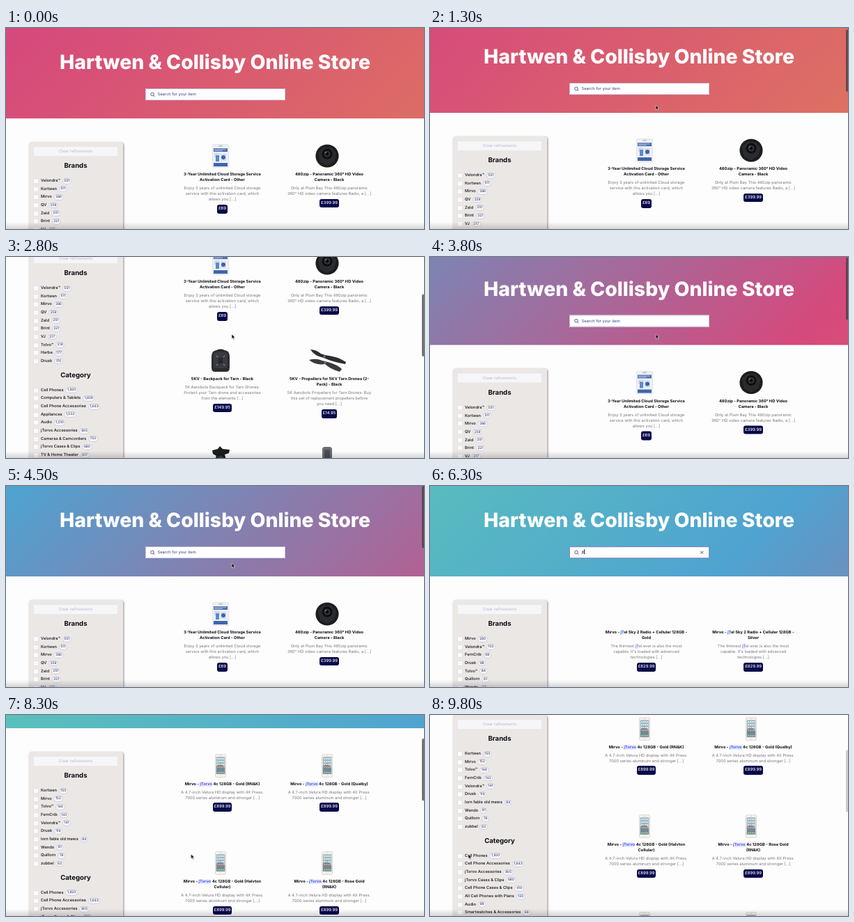
Recreate the animation shown at these times as an HTML page. Size 600x289 px, loop 10000 ms.

```html
<!DOCTYPE html>
<html lang="en">
<head>
<meta charset="utf-8">
<title>Online Store</title>
<style>
@property --scroll { syntax: '<number>'; inherits: true; initial-value: 0; }
*, ::before { box-sizing: border-box; margin: 0; padding: 0; }
html, body { width: 100%; height: 100%; overflow: hidden; background: #fefdfe; }
#stage {
  --t: 0;
  --now: calc(var(--t) * -1ms);
  position: relative; width: 600px; height: 289px; overflow: hidden;
  font: 500 5.75px/8.3px Inter, sans-serif; color: #0d0d12;
  text-rendering: geometricPrecision; white-space: nowrap;
  animation: scroll 10s linear var(--now) infinite paused;
}
#stage > *, .at { position: absolute; }
#page { inset: 0; transform: translateY(calc(var(--scroll) * -1px)); }

#hero {
  left: 0; top: 0; width: 600px; height: 130px;
  background: linear-gradient(-45deg, #df7b5b, #d6497c, #4fa3d1, #60d0b0) 0 50% / 400% 400%;
  animation: drift 15s ease calc(var(--now) - 5500ms) infinite paused;
}
h1 { left: 0; top: 29px; width: 600px; text-align: center; color: #fff; font: 800 28.4px/40px Inter, sans-serif; }
#search {
  left: 200px; top: 87px; width: 200.5px; height: 16.5px; padding-left: 16.5px;
  background: #fff; border: .8px solid #c9c6dc; line-height: 15px; font-weight: 400; color: #3b3c85;
}
#search.focus { border-color: #8f8cc0; }
#search.filled { color: #111; }
#search svg { position: absolute; left: 0; top: 0; fill: none; stroke: #34357a; stroke-width: .8; overflow: visible; }
#caret { display: none; width: .6px; height: 7px; background: #222; vertical-align: -1px; }
#clear { display: none; }
.focus #caret { display: inline-block; }
.filled #clear { display: inline; }

#panel { left: 33px; top: 163.5px; width: 135px; height: 420px; border-radius: 4px; background: #ebe7e5; box-shadow: 1px 1px 3px #8f8a8a; }
#reset { left: 40px; top: 170.5px; width: 120px; height: 13.5px; background: #f6f5f7; color: #bcb9ce; text-align: center; line-height: 13.5px; font-weight: 400; }
.facet { left: 40px; width: 120px; }
.facet h2 { font: 700 9.6px/20px Inter, sans-serif; text-align: center; margin-bottom: 5px; }
.facet p { display: flex; align-items: center; height: 11.67px; }
.facet p::before { content: ''; width: 6px; height: 6px; margin-right: 4px; background: #fbfafc; box-shadow: 0 0 0 .4px #dcd9e6; border-radius: 1px; }
.facet i { margin-left: 3.8px; padding: 0 1.7px; font: 400 4.8px/6.8px Inter, sans-serif; color: #24275c; background: #f5f4f9; box-shadow: 0 0 0 .4px #b4b7d4; border-radius: 3.4px; }

.card { width: 150px; text-align: center; }
.card svg { display: block; width: 60px; height: 34px; margin: 0 auto 6px; transform: translateX(-3px); }
.card h3 { font: 700 5.75px/8.3px Inter, sans-serif; }
.card p { margin: 3.3px 0 2.2px; color: #77777d; font-weight: 400; }
.card b { display: inline-block; padding: 0 1.9px; border-radius: 3px; background: #07084a; color: #fff; font: 500 5.9px/12.6px Inter, sans-serif; }
mark { color: #4a5ce6; background: #e5e8ff; border-radius: 1px; }

#shade { left: 0; top: 279px; width: 600px; height: 10px; background: linear-gradient(#0000, #00000028); animation: shade 10s step-end var(--now) infinite paused; }
#thumb {
  left: 597px; top: 0; width: 3px; height: 89px; border-radius: 1.5px 0 0 1.5px; background: #3c3c40b8;
  transform: translateY(calc(var(--scroll) * .307px)); animation: thumb 10s linear var(--now) infinite paused;
}
#cursor { left: 0; top: 0; width: 6px; height: 8px; overflow: visible; animation: move 10s linear var(--now) infinite paused, seen 10s step-end var(--now) infinite paused; }

@keyframes drift { 50% { background-position: 100% 50%; } }
@keyframes scroll {
  0%, 11% { --scroll: 0; }
  13% { --scroll: 8; }
  15% { --scroll: 24; }
  18% { --scroll: 52; }
  20% { --scroll: 82; }
  23% { --scroll: 130; }
  25% { --scroll: 156; }
  28% { --scroll: 175; }
  30% { --scroll: 176; }
  33% { --scroll: 115; }
  35% { --scroll: 48; }
  38% { --scroll: 3.5; }
  40% { --scroll: 1; }
  43%, 76% { --scroll: 0; }
  78% { --scroll: 20; }
  80% { --scroll: 60; }
  83% { --scroll: 111; }
  85% { --scroll: 141; }
  88% { --scroll: 160; }
  90%, 100% { --scroll: 164; }
}
@keyframes shade { 15% { opacity: 0; } 23% { opacity: 1; } }
@keyframes thumb {
  0%, 12% { opacity: 0; }
  13%, 48% { opacity: 1; }
  53%, 77% { opacity: 0; }
  78%, 95% { opacity: 1; }
  98%, 100% { opacity: .35; }
}
@keyframes move {
  0%, 45% { transform: translate(324px, 111px); }
  48% { transform: translate(318px, 108px); }
  50% { transform: translate(290px, 99px); }
  53% { transform: translate(250px, 95px); }
  55%, 63% { transform: translate(238px, 94px); }
  63.01%, 90% { transform: translate(265.5px, 200px); }
  93% { transform: translate(240px, 200px); }
  95% { transform: translate(120px, 201px); }
  98%, 100% { transform: translate(55px, 200px); }
}
@keyframes seen {
  0% { opacity: 0; }
  13% { opacity: 1; }
  58% { opacity: 0; }
  78%, 100% { opacity: 1; }
}
</style>
</head>
<body>
<div id="stage">
  <div id="page">
    <div id="hero" class="at"></div>
    <h1 class="at">Hartwen &amp; Collisby Online Store</h1>
    <div id="search" class="at">
      <svg width="200" height="15">
        <circle cx="9" cy="7.2" r="2.3"/><path d="M10.7 8.9l1.8 1.8"/>
        <path id="clear" stroke="#222" d="M187.3 5.5l4 4m0-4l-4 4"/>
      </svg><span id="typed"></span><span id="caret"></span>
    </div>
    <div id="panel" class="at"></div>
    <div id="reset" class="at">Clear refinements</div>
    <div id="results"></div>
  </div>
  <div id="shade"></div>
  <div id="thumb"></div>
  <svg id="cursor"><path d="M0 0v6.6l1.6-1.4 1.1 2.5 1.2-.5-1.1-2.4h2.2z" fill="#111" stroke="#fff" stroke-width=".5"/></svg>
</div>
<script>
const pictures = {
  none: '',
  pass: `<rect x="18.5" y=".5" width="23" height="33" rx="1.5" fill="#eef1f6" stroke="#cfd5de" stroke-width=".6"/>
    <rect x="27" y="1.8" width="6" height="1.6" rx=".8" fill="#b5bdca"/><rect x="20" y="6" width="20" height="5" fill="#4a6cb0"/>
    <path d="M21 7.7h17M21 9.4h12" stroke="#dfe8f6" stroke-width=".7"/><path d="M21 14h8M21 16h7M21 18h8" stroke="#9dafcd" stroke-width=".7"/>
    <rect x="23" y="16" width="5" height="9" fill="#5c8bc9"/><rect x="30" y="14" width="8" height="10" fill="#d5deeb"/>
    <circle cx="34" cy="19" r="3" fill="#3c62ae"/><rect x="20" y="27" width="20" height="5" fill="#4064ac"/>`,
  ball: `<circle cx="30" cy="17" r="16.6" fill="#1d1e20"/><path d="M16 12l8-8 12 0 8 9-3 12-11 7-11-6z" fill="#2a2b2e" stroke="#0e0e10" stroke-width=".6"/>
    <circle cx="30" cy="14" r="7.5" fill="#0d0d0f"/><circle cx="30" cy="14" r="4.6" fill="#34363a"/><circle cx="30" cy="14" r="2.4" fill="#09090b"/>
    <circle cx="28" cy="12" r="1" fill="#85888e"/>`,
  pack: `<path d="M21 3q9-4 18 0 4 2 4 9v15q0 6-5 6H22q-5 0-5-6V12q0-7 4-9z" fill="#2b2c2f"/><rect x="20" y="5" width="20" height="23" rx="4" fill="#3a3b3f"/>
    <path d="M26 2q4-2 8 0" fill="none" stroke="#111" stroke-width="1.2"/><path d="M24 10l2 2m10-2l-2 2M24 24l2-2m10 2l-2-2" stroke="#b9bbc0" stroke-width=".9"/>
    <rect x="27" y="13" width="6" height="8" rx="1" fill="#26272a"/>`,
  blades: `<path d="M6 1q8 0 15 6l6 2q18 2 30 10l-1 3q-18-3-31-9-14-3-19-12z" fill="#2c2d30"/>
    <path d="M4 16q10-3 19 1l8 2q14 4 20 10l-3 4q-14-4-21-11-14 2-23-6z" fill="#3a3b3e"/>
    <circle cx="26" cy="11" r="1.6" fill="#77797e"/><circle cx="27" cy="20" r="1.6" fill="#77797e"/>`,
  gimbal: `<path d="M18 6l8-2 3-4 4 4 10 1-1 5-6 2 2 8-4 8-9 2-5-7 4-9-5-3z" fill="#1c1d1f"/><circle cx="30" cy="19" r="5" fill="#3c3e42"/>`,
  pod: `<rect x="23" y="1" width="14" height="32" rx="4" fill="#6b6d72"/><rect x="26" y="5" width="8" height="23" rx="2" fill="#4b4d52"/>`,
  phone: `<rect x="22.5" y=".3" width="15" height="33.4" rx="2.4" fill="#f6f2ee" stroke="#cdbfb2" stroke-width=".6"/>
    <rect x="23.8" y="4.2" width="12.4" height="24.6" fill="#9db9c6"/><path d="M23.8 18l6-5 6.4 7v8.8H23.8z" fill="#71899a"/>
    <path d="M25.2 7h10M25.2 11h10M25.2 15h10" stroke="#e6ece9" stroke-width="1.8" stroke-dasharray="1.8 .9"/>
    <path d="M25.2 19h10" stroke="#e2a077" stroke-width="1.8" stroke-dasharray="1.8 .9"/>
    <path d="M25.2 26.7h10" stroke="#a9d98a" stroke-width="1.8" stroke-dasharray="1.8 .9"/>
    <circle cx="30" cy="31.2" r="1.2" fill="#fff" stroke="#cdbfb2" stroke-width=".4"/><path d="M28.5 2.3h3" stroke="#b5aaa2" stroke-width=".5"/>`
};

const tablet = colour => ['none', `Mirvo - jTel Sky 2 Radio + Cellular 128GB -|${colour}`,
  "The thinnest jTel ever is also the most|capable. It's loaded with advanced|technologies [...]", '£829.99'];
const phone = suffix => ['phone', `Mirvo - jTorvo 4c 128GB - ${suffix}`,
  'A 4.7-inch Velura HD display with 4X Press.|7000 series aluminum and stronger [...]', '£899.99'];

const phoneCategories = 'Cell Phones:1,920/Cell Phone Accessories:1,643/jTorvo Accessories:805/jTorvo Cases & Clips:680/Cell Phone Cases & Clips:414/All Cell Phones with Plans:135/Audio:98/Smartwatches & Accessories:68/Headphones:52';
const catalogue = {
  all: {
    brands: 'Velondra™:551/Kortwen:511/Mirvo:386/QV:259/Zeld:251/Brint:221/VJ:217/Tolvo™:214/Harbe:177/Drusk:170',
    categories: 'Cell Phones:1,920/Computers & Tablets:1,858/Cell Phone Accessories:1,643/Appliances:1,533/Audio:1,010/jTorvo Accessories:805/Cameras & Camcorders:753/jTorvo Cases & Clips:680/TV & Home Theater:617/Home Audio:546',
    cards: [
      ['pass', '3-Year Unlimited Cloud Storage Service|Activation Card - Other', 'Enjoy 3 years of unlimited Cloud storage|service with this activation card, which|allows you [...]', '£69'],
      ['ball', '480zip - Panoramic 360° HD Video|Camera - Black', 'Only at Plum Bay This 480zip panoramic|360° HD video camera features Radio, a [...]', '£399.99'],
      ['pack', '5KV - Backpack for Tarn - Black', '5K Aerobots Backpack for Tarn Drones:|Protect your Tarn drone and accessories|from the elements [...]', '£149.95'],
      ['blades', '5KV - Propellers for 5KV Tarn Drones (2-|Pack) - Black', '5K Aerobots Propellers for Tarn Drones: Buy|this set of replacement propellers before|you need [...]', '£14.95'],
      ['gimbal', '5KV - Tarn Gimbal - Black', '', '£249.99'],
      ['pod', '5KV - Tarn Battery - Gray', '', '£149.99']
    ]
  },
  tablets: {
    brands: 'Mirvo:280/Velondra™:102/FernCrib:98/Drusk:98/Tolvo™:84/Quillorn:81/Wendo:77',
    categories: phoneCategories,
    cards: ['Gold', 'Silver'].map(tablet)
  },
  phones: {
    brands: 'Kortwen:155/Mirvo:152/Tolvo™:144/FernCrib:143/Velondra™:141/Drusk:114/lorn fable old mews:84/Wendo:81/Quillorn:76/zubbel:63',
    categories: phoneCategories,
    cards: ['Gold (RN&K)', 'Gold (Quelby)', 'Gold (Halvton|Cellular)', 'Rose Gold|(RN&K)', 'Silver (RN&K)', 'Silver (Quelby)'].map(phone)
  }
};

const $ = id => document.getElementById(id);
const escape = s => s.replace(/&/g, '&amp;');

function rich(text, query) {
  let html = escape(text);
  if (query) html = html.replace(new RegExp(query, 'gi'), '<mark>$&</mark>');
  return html.replace(/\|/g, '<br>');
}

function facet(title, top, list) {
  const rows = list.split('/').map(row => {
    const [label, count] = row.split(':');
    return `<p>${escape(label)}<i>${count}</i></p>`;
  });
  return `<div class="facet at" style="top:${top}px"><h2>${title}</h2>${rows.join('')}</div>`;
}

function card([picture, title, text, price], i, query) {
  const left = i % 2 ? 389 : 235.5, top = 167 + 140 * (i >> 1);
  return `<div class="card at" style="left:${left}px;top:${top}px">
    <svg viewBox="0 0 60 34">${pictures[picture]}</svg>
    <h3>${rich(title, query)}</h3><p>${rich(text, query)}</p><b>${price}</b></div>`;
}

function show(query) {
  const { brands, categories, cards } = catalogue[!query ? 'all' : query.length < 3 ? 'tablets' : 'phones'];
  $('typed').textContent = query || 'Search for your item';
  $('search').classList.toggle('filled', !!query);
  $('results').innerHTML = facet('Brands', 189.3, brands) + facet('Category', 336, categories)
    + cards.map((c, i) => card(c, i, query)).join('');
}

const keyTimes = [6300, 6300, 6500, 6800, 7000, 7300];
const start = performance.now();
let shown = null;

function tick() {
  const t = (performance.now() - start) % 10000;
  // The picture advances in alternating holds of 300 and 200 ms.
  const step = Math.floor(t / 500) * 500 + (t % 500 >= 300 ? 300 : 0);
  $('stage').style.setProperty('--t', step);
  $('search').classList.toggle('focus', step >= 5500);
  const query = 'jtorvo'.slice(0, keyTimes.filter(k => k <= step).length);
  if (query !== shown) show(shown = query);
  requestAnimationFrame(tick);
}
tick();
</script>
</body>
</html>
```
